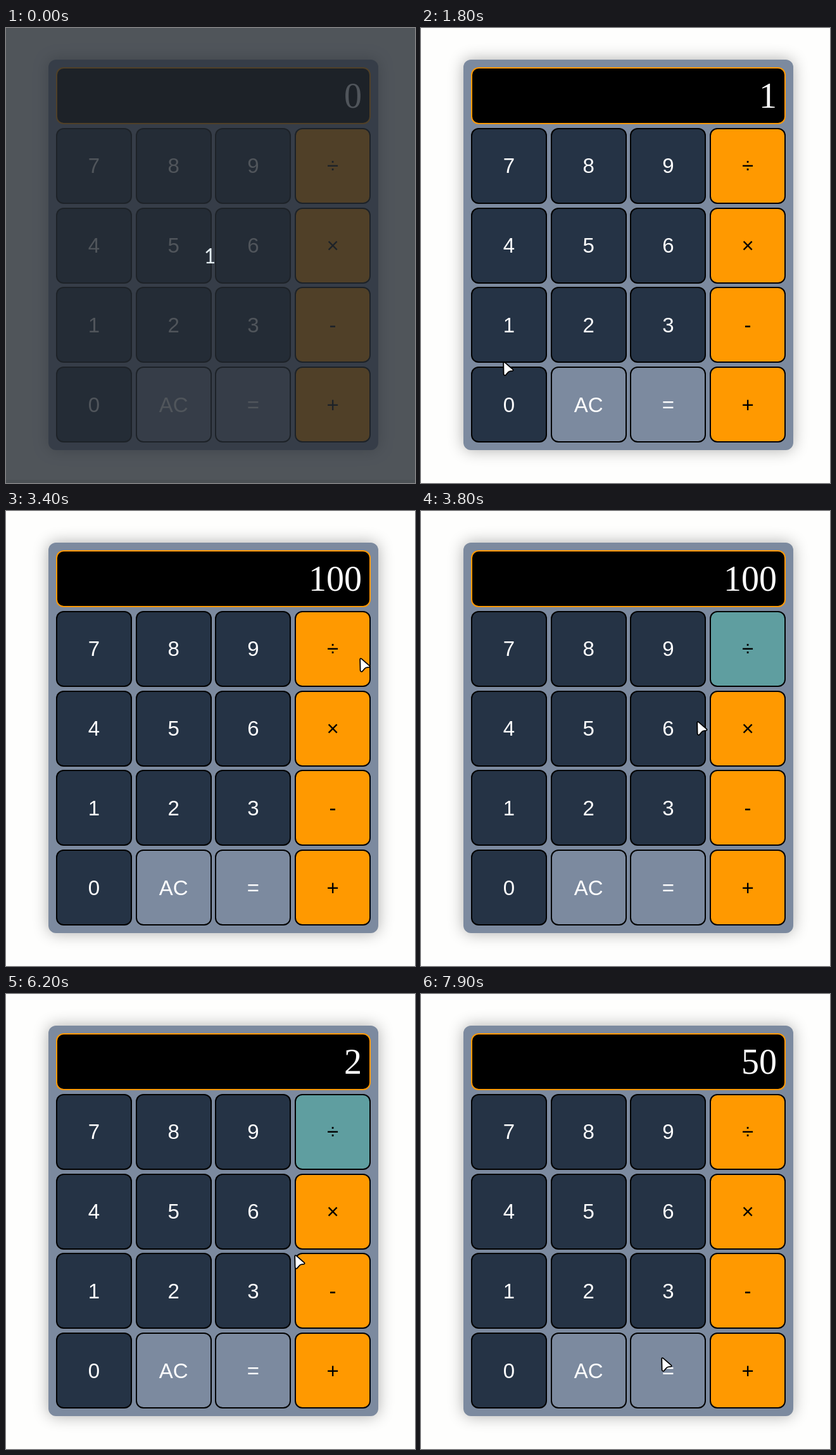
An HTML page with a canvas for the animation above (8 s loop, 646 by 719 pixels).

```html
<!DOCTYPE html>
<html lang="en">
<head>
<meta charset="utf-8">
<title>Calculator</title>
<style>
  html, body { margin: 0; width: 100%; height: 100%; overflow: hidden; background: #fefefd; }
  canvas { display: block; }
</style>
</head>
<body>
<canvas id="stage" width="646" height="719"></canvas>
<script>
const W = 646, H = 719, LOOP = 8000, STEP = 100;
const ctx = document.getElementById('stage').getContext('2d');

const SLATE = '#7c8a9f', NAVY = '#253345', ORANGE = '#ff9900', TEAL = '#5f9ea0';
const LEFT = 79, TOP = 158, KEY = 120, PITCH = 125.7, RADIUS = 12;
const LABELS = [...'789÷456×123-0', 'AC', '=', '+'];
const MATH = {
  '÷': (a, b) => a / b, '×': (a, b) => a * b,
  '-': (a, b) => a - b, '+': (a, b) => a + b
};

const PRESSES = [
  { at: 1500, key: '1' }, { at: 2300, key: '0' }, { at: 2400, key: '0' },
  { at: 3600, key: '÷' }, { at: 4600, key: '2' }, { at: 7900, key: '=' }
];

// each stroke starts where the one before it ended
const ENTRY = { x: -30, y: 590 };
const STROKES = [
  { from: 400, until: 1300, x: 121, y: 461 },
  { from: 1580, until: 2200, x: 136, y: 585 },
  { from: 2500, until: 3100, x: 569, y: 262 },
  { from: 3100, until: 3400, x: 558, y: 232 },
  { from: 3550, until: 4500, x: 260, y: 474 },
  { from: 5600, until: 6800, x: 527, y: 362, bend: 0.15 },
  { from: 7000, until: 7600, x: 379, y: 574 }
];

function calculate(t) {
  let shown = '0', stored = 0, op = null, fresh = true;
  for (const { at, key } of PRESSES) {
    if (at > t) break;
    if (MATH[key]) {
      stored = +shown;
      op = key;
      fresh = true;
    } else if (key === '=') {
      shown = String(MATH[op](stored, +shown));
      op = null;
      fresh = true;
    } else {
      shown = fresh ? key : shown + key;
      fresh = false;
    }
  }
  return { shown, op };
}

function pointerAt(t) {
  let p = ENTRY;
  for (const { from, until, x, y, bend = 0 } of STROKES) {
    if (t <= from) break;
    const u = 1 - (1 - Math.min(1, (t - from) / (until - from))) ** 1.75;
    const dx = x - p.x, dy = y - p.y, side = 2 * u * (1 - u) * bend;
    p = { x: p.x + dx * u - dy * side, y: p.y + dy * u + dx * side };
  }
  return p;
}

function box(x, y, w, h, r, color) {
  ctx.fillStyle = color;
  ctx.beginPath();
  ctx.roundRect(x, y, w, h, r);
  ctx.fill();
}

function framed(x, y, w, h, edge, fill) {
  box(x, y, w, h, RADIUS, edge);
  box(x + 2, y + 2, w - 4, h - 4, RADIUS - 2, fill);
}

function label(text, x, y, font, color, align) {
  ctx.font = font;
  ctx.textAlign = align;
  ctx.fillStyle = color;
  ctx.fillText(text, x, y);
}

function keyColor(name, op) {
  if (name === op) return TEAL;
  if (MATH[name]) return ORANGE;
  return name === 'AC' || name === '=' ? SLATE : NAVY;
}

function drawCalculator(t) {
  const { shown, op } = calculate(t);
  ctx.fillStyle = '#fefefd';
  ctx.fillRect(0, 0, W, H);

  ctx.save();
  ctx.shadowColor = 'rgba(0,0,0,.32)';
  ctx.shadowBlur = 24;
  box(67, 50, 521, 617, RADIUS, SLATE);
  ctx.restore();

  framed(LEFT, 62, 497, 90, ORANGE, '#000');
  label(shown, 562, 126, '56px "Liberation Serif", "Times New Roman", serif', '#fff', 'right');

  LABELS.forEach((name, i) => {
    const x = LEFT + PITCH * (i % 4), y = TOP + PITCH * Math.floor(i / 4);
    framed(Math.round(x), Math.round(y), KEY, KEY, '#000', keyColor(name, op));
    label(name, x + KEY / 2, Math.round(y + 71.4),
      '33px "Liberation Sans", Arial, sans-serif', MATH[name] ? '#000' : '#fff', 'center');
  });
}

function drawPointer(t) {
  const { x, y } = pointerAt(t);
  ctx.save();
  ctx.translate(Math.round(x), Math.round(y));
  ctx.beginPath();
  ctx.moveTo(1.2, 2.2);
  ctx.quadraticCurveTo(1.6, 0.5, 3.6, 1.6);
  ctx.lineTo(16.2, 12.6);
  ctx.quadraticCurveTo(17.4, 14.2, 15.4, 14.9);
  ctx.quadraticCurveTo(10.2, 15.2, 8.6, 17);
  ctx.lineTo(4.8, 21.4);
  ctx.quadraticCurveTo(2.6, 22.8, 1.6, 20);
  ctx.closePath();
  ctx.lineJoin = 'round';
  ctx.lineWidth = 1.8;
  ctx.strokeStyle = '#000';
  ctx.fillStyle = '#fff';
  ctx.fill();
  ctx.stroke();
  ctx.restore();
}

function drawCountdown() {
  ctx.fillStyle = 'rgba(37,43,50,.8)';
  ctx.fillRect(0, 0, W, H);
  ctx.fillStyle = 'rgba(0,0,0,.05)';
  ctx.fillRect(0, 714, W, 5);
  label('1', 322, 372, '32px Lato, "Liberation Sans", sans-serif', '#e4eef2', 'center');
}

function draw(elapsed) {
  const t = Math.floor(elapsed % LOOP / STEP) * STEP;
  drawCalculator(t);
  drawPointer(t);
  if (t < STEP) drawCountdown();
}

let start;
function tick(now) {
  start ??= now;
  draw(now - start);
  requestAnimationFrame(tick);
}
draw(0);
requestAnimationFrame(tick);
</script>
</body>
</html>
```
